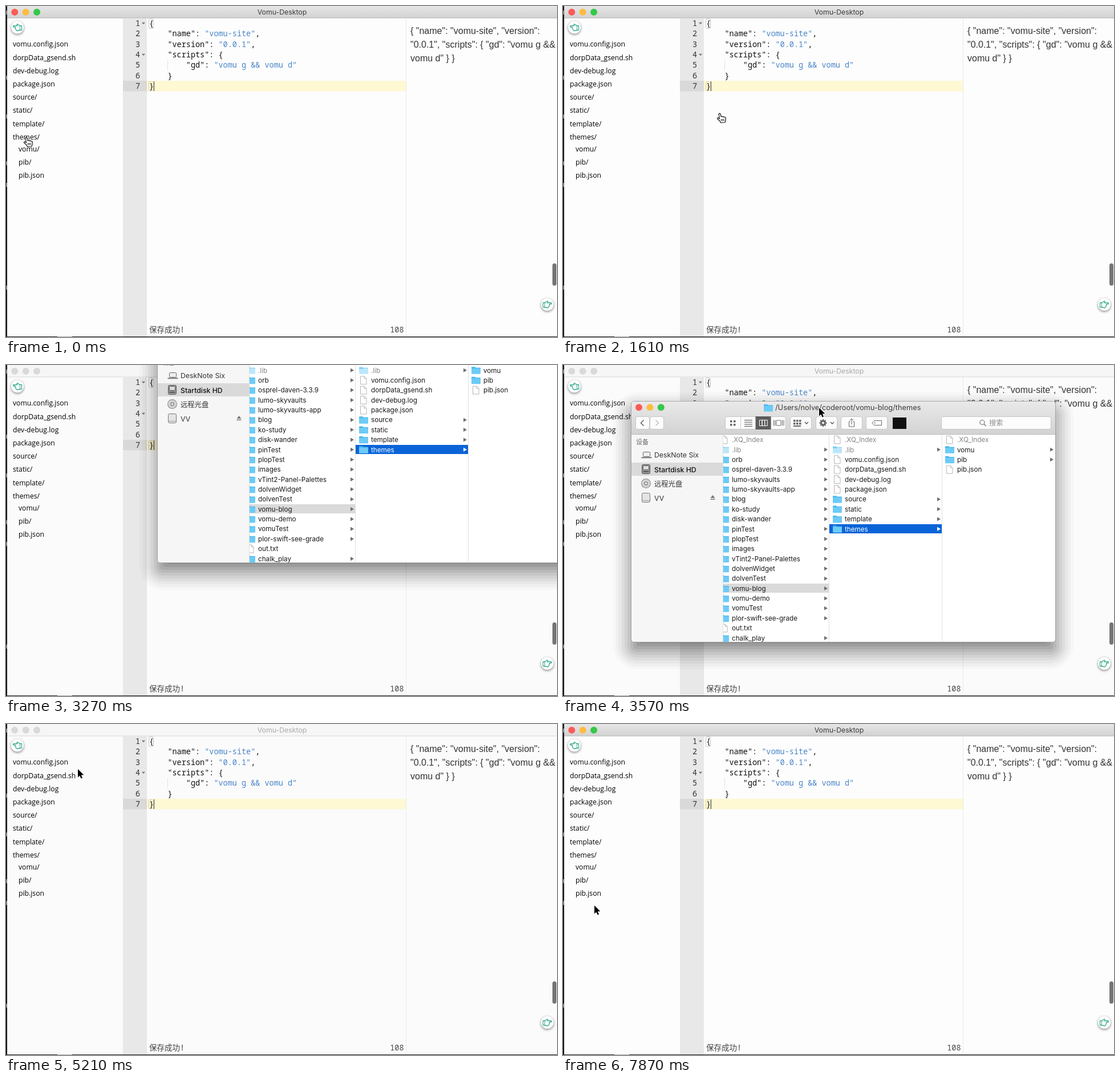
An HTML page with a canvas that plays this animation: 966 px wide and 580 px high, repeating every 8 s.

```html
<!DOCTYPE html>
<html lang="en">
<head>
<meta charset="utf-8">
<title>Desktop editor</title>
<style>
html, body { margin: 0; width: 100%; height: 100%; overflow: hidden; background: #fff; }
canvas { display: block; width: 966px; height: 580px; }
</style>
</head>
<body>
<canvas id="stage"></canvas>
<script>
const W = 966, H = 580, LOOP = 8000, STEP = 148.5;
const canvas = document.getElementById('stage');
const ctx = canvas.getContext('2d');
const dpr = window.devicePixelRatio || 1;
canvas.width = W * dpr;
canvas.height = H * dpr;

const UI = 'Inter, "Noto Sans CJK SC", "Noto Sans CJK", sans-serif';
const LIST = '12.2px "Open Sans", "Noto Sans", sans-serif';
const CODE = '13.5px "Noto Sans Mono", "Noto Sans CJK SC", "Noto Sans CJK", monospace';
const PROSE = '16px "Liberation Sans", sans-serif';
const LIGHTS = ['#fc5b57', '#fdbc40', '#34c84a'];
const BLUE = '#4a85c8', PICKED = '#0a64d8';

// Cursor path: step, x, y
const PATH = [
  [0, 36, 231], [5, 36, 231], [11, 275, 189], [15, 560, -40], [18, 729, -419],
  [22, 595, -64], [24, 449, 75], [29, 449, 75], [32, 133, 74], [33, 133, 74],
  [35, 126, 79], [42, 53, 297], [46, 53, 297], [50, 55, 318], [54, 55, 318]
];

const FILES = ['vomu.config.json', 'dorpData_gsend.sh', 'dev-debug.log', 'package.json',
  'source/', 'static/', 'template/', 'themes/'];
const CHILDREN = ['vomu/', 'pib/', 'pib.json'];

const COL1 = ['.XQ_Index', '.lib', 'orb', 'osprel-daven-3.3.9', 'lumo-skyvaults',
  'lumo-skyvaults-app', 'blog', 'ko-study', 'disk-wander', 'pinTest', 'plopTest',
  'images', 'vTint2-Panel-Palettes', 'dolvenWidget', 'dolvenTest', 'vomu-blog',
  'vomu-demo', 'vomuTest', 'plor-swift-see-grade', 'out.txt', 'chalk_play'];
const COL2 = ['.XQ_Index', '.lib', 'vomu.config.json', 'dorpData_gsend.sh',
  'dev-debug.log', 'package.json', 'source', 'static', 'template', 'themes'];
const COL3 = ['.XQ_Index', 'vomu', 'pib', 'pib.json'];

function rect(x, y, w, h, fill) {
  ctx.fillStyle = fill;
  ctx.fillRect(x, y, w, h);
}

function round(x, y, w, h, r, fill, stroke) {
  ctx.beginPath();
  ctx.roundRect(x, y, w, h, r);
  if (fill) { ctx.fillStyle = fill; ctx.fill(); }
  if (stroke) { ctx.strokeStyle = stroke; ctx.lineWidth = 1; ctx.stroke(); }
}

function disc(x, y, r, fill) {
  ctx.beginPath();
  ctx.arc(x, y, r, 0, Math.PI * 2);
  ctx.fillStyle = fill;
  ctx.fill();
}

function text(s, x, y, font, fill = '#000', align = 'left') {
  ctx.font = font;
  ctx.fillStyle = fill;
  ctx.textAlign = align;
  ctx.fillText(s, x, y);
}

function poly(points, fill, stroke, width = 1, open) {
  ctx.beginPath();
  points.forEach(([x, y], i) => i ? ctx.lineTo(x, y) : ctx.moveTo(x, y));
  if (!open) ctx.closePath();
  if (fill) { ctx.fillStyle = fill; ctx.fill(); }
  if (stroke) { ctx.strokeStyle = stroke; ctx.lineWidth = width; ctx.stroke(); }
}

function vertical(y0, y1, a, b) {
  const g = ctx.createLinearGradient(0, y0, 0, y1);
  g.addColorStop(0, a);
  g.addColorStop(1, b);
  return g;
}

function lights(x, y, active) {
  LIGHTS.forEach((c, i) => disc(x + i * 19.4, y, 6, active ? c : '#d9d9d9'));
}

// Round button with a pointing hand; dir 1 points right
function handButton(x, y, dir) {
  ctx.save();
  ctx.shadowColor = 'rgba(0,0,0,.5)';
  ctx.shadowBlur = 4 * dpr;
  ctx.shadowOffsetY = 1.5 * dpr;
  disc(x, y, 11, '#fff');
  ctx.restore();
  ctx.save();
  ctx.translate(x, y);
  ctx.scale(dir, 1);
  ctx.lineJoin = 'round';
  poly([[-7.5, -3], [-4, -3], [0, -6], [1, -5], [0, -3], [7, -3], [7.5, -1], [3.5, -0.5],
    [4, 1.5], [3, 2], [3, 4], [2, 4.5], [1, 6], [-4, 5], [-7.5, 4.5]], null, '#35ab8f', 1.3);
  poly([[-4.5, -3], [-4.5, 5]], null, '#35ab8f', 1, true);
  ctx.restore();
}

function codeLine(n, parts) {
  let col = 0;
  const y = 34.8 + (n - 1) * 18.35;
  for (const [s, fill] of parts) {
    text(s, 251 + col * 8.1, y, CODE, fill || '#111');
    col += s.length;
  }
}

function editor() {
  rect(205, 22, 42, 558, '#e8e8e8');
  rect(205, 131, 42, 18.5, '#d9d9d9');
  rect(247, 131, 454, 18.5, '#fef8d3');
  rect(701, 22, 1, 558, '#e9e9e9');
  rect(283, 95, 1, 18, '#e2e2e2');
  for (let n = 1; n <= 7; n++) {
    const y = 34.8 + (n - 1) * 18.35;
    text(n, 235, y, CODE, '#333', 'right');
    if (n === 1 || n === 4) poly([[238, y - 6], [244, y - 6], [241, y - 2.5]], '#777');
  }
  round(250.5, 22.5, 8, 17, 2, null, '#c4c4c4');
  round(250.5, 132.5, 8, 16, 2, null, '#d5d0b5');
  codeLine(1, [['{']]);
  codeLine(2, [['    "name": '], ['"vomu-site"', BLUE], [',']]);
  codeLine(3, [['    "version": '], ['"0.0.1"', BLUE], [',']]);
  codeLine(4, [['    "scripts": {']]);
  codeLine(5, [['        "gd": '], ['"vomu g && vomu d"', BLUE]]);
  codeLine(6, [['    }']]);
  codeLine(7, [['}']]);
  rect(259, 132, 1, 17, '#444');
  text('保存成功!', 251, 572, CODE, '#444');
  text('108', 697.5, 572, CODE, '#444', 'right');
}

function mainWindow(active, tint) {
  rect(0, 0, W, H, active ? '#fdfdfd' : '#fbfbfb');
  if (tint) rect(2, 22, 155, 558, '#f4f5fa');
  editor();

  rect(0, 0, W, 21, active ? vertical(0, 21, '#e6e6e6', '#d2d2d2') : '#f6f6f6');
  rect(0, 20.5, W, 1, active ? '#b5b5b5' : '#d8d8d8');
  lights(15.3, 10.8, active);
  text('Vomu-Desktop', 484, 15.3, '12.3px ' + UI, active ? '#3c3c3c' : '#aaa', 'center');

  FILES.forEach((s, i) => text(s, 12, 71.4 + i * 23.2, LIST));
  CHILDREN.forEach((s, i) => text(s, 22, 255.2 + i * 23, LIST));

  text('{ "name": "vomu-site", "version":', 709, 48.6, PROSE, '#333');
  text('"0.0.1", "scripts": { "gd": "vomu g &&', 709, 72.6, PROSE, '#333');
  text('vomu d" } }', 709, 96.6, PROSE, '#333');

  round(958, 451, 7, 39, 3.5, '#757575');
  handButton(20, 37.5, -1);
  handButton(949, 523, 1);

  rect(0, 0, 2, H, '#111');
  [8, 122, 190, 272, 310, 490].forEach(y => rect(0, y, 2, 7, '#777'));
  rect(0, 579, W, 1, '#222');
  rect(90, 579, 26, 1, '#aaa');
}

function folder(x, y, faded) {
  ctx.globalAlpha = faded ? 0.45 : 1;
  round(x, y - 6, 7, 4, 1, '#43b4e6');
  round(x, y - 4.5, 16, 11, 1, '#6ccbf7');
  rect(x, y - 4.5, 16, 1, '#43b4e6');
  ctx.globalAlpha = 1;
}

function page(x, y) {
  poly([[x + 2.5, y - 7], [x + 9, y - 7], [x + 13, y - 3], [x + 13, y + 7], [x + 2.5, y + 7]],
    '#fff', '#b5b5b5');
  poly([[x + 9, y - 7], [x + 9, y - 3], [x + 13, y - 3]], null, '#b5b5b5', 1, true);
}

function column(items, x, right, selected, fill) {
  items.forEach((s, i) => {
    const y = 67 + i * 17.37;
    const chosen = i === selected;
    const light = chosen && fill === PICKED;
    const hidden = s[0] === '.';
    const isFile = s === '.XQ_Index' || /\.(json|sh|log|txt)$/.test(s);
    if (chosen) rect(x - 6, Math.round(y - 8.3), right - x + 6, 16, fill);
    if (isFile) page(x, y); else folder(x, y, hidden);
    text(s, x + 21, y + 4.2, '11.7px ' + UI, light ? '#fff' : hidden ? '#858585' : '#1a1a1a');
    if (!isFile) {
      const a = right - 8;
      poly([[a, y - 3.5], [a + 6, y], [a, y + 3.5]], light ? '#fff' : '#6f6f6f');
    }
  });
}

function button(x, w) {
  round(x + .5, 26.5, w - 1, 22, 3.5, '#fcfcfc', '#c6c6c6');
}

function chevron(x, y) {
  poly([[x - 3, y - 1.5], [x, y + 1.5], [x + 3, y - 1.5]], null, '#555', 1.4, true);
}

function grid(x, y, size, gap, cols, rows) {
  for (let i = 0; i < cols * rows; i++)
    rect(x + (i % cols) * gap, y + Math.floor(i / cols) * gap, size, size, '#666');
}

function toolbar() {
  button(7, 25);
  button(32, 25);
  poly([[21.5, 32.5], [16.5, 37.5], [21.5, 42.5]], null, '#555', 1.4, true);
  poly([[42.5, 32.5], [47.5, 37.5], [42.5, 42.5]], null, '#bbb', 1.4, true);

  button(164, 107);
  rect(191, 27, 1, 22, '#ccc');
  rect(244, 27, 1, 22, '#ccc');
  grid(173, 33, 3.5, 6, 2, 2);
  for (let i = 0; i < 4; i++) rect(198, 32 + i * 3.6, 14, 1.2, '#666');
  rect(217.5, 26, 27, 23, '#5c5c5c');
  for (let i = 0; i < 3; i++) round(224.5 + i * 4.6, 32.5, 4.6, 10, 0, null, '#fff');
  round(254, 33, 8, 9, 1, null, '#666');
  [249, 251.5, 264, 266.5].forEach(x => rect(x, 32.5, 1, 10, '#666'));

  button(278, 38);
  grid(284, 32, 3.5, 5, 3, 2);
  rect(284, 42, 13, 2, '#666');
  chevron(307, 37.5);
  button(323, 38);
  for (let i = 0; i < 8; i++) {
    const a = i * Math.PI / 4, c = Math.cos(a), s = Math.sin(a);
    poly([[336 + c * 3, 37.5 + s * 3], [336 + c * 6.5, 37.5 + s * 6.5]], null, '#666', 2.4, true);
  }
  disc(336, 37.5, 4.8, '#666');
  disc(336, 37.5, 1.9, '#fcfcfc');
  chevron(352, 37.5);

  button(367, 38);
  poly([[383.5, 35], [381.5, 35], [381.5, 44], [390.5, 44], [390.5, 35], [388.5, 35]],
    null, '#666', 1, true);
  poly([[386, 40], [386, 30]], null, '#666', 1, true);
  poly([[383, 33], [386, 30], [389, 33]], null, '#666', 1, true);
  button(411, 38);
  poly([[422, 37.5], [425.5, 33.5], [438.5, 33.5], [438.5, 41.5], [425.5, 41.5]], null, '#666');
  disc(426.5, 37.5, 1, '#666');
  rect(458, 28, 24, 20, '#111');

  button(543, 193);
  ctx.beginPath();
  ctx.arc(615, 36.5, 4, 0, Math.PI * 2);
  ctx.strokeStyle = '#777';
  ctx.lineWidth = 1.2;
  ctx.stroke();
  poly([[618, 39.5], [621.5, 43]], null, '#777', 1.4, true);
  text('搜索', 627, 42.2, '12.3px ' + UI, '#8c8c8c');
}

function sidebar() {
  rect(0, 58, 160, 363, '#f6f6f6');
  text('设备', 8, 75.3, '500 11px ' + UI, '#6a6a6a');
  rect(0, 107, 160, 23, '#dadada');
  round(20.5, 88.5, 12, 8, 1, '#eee', '#666');
  rect(17.5, 97.5, 18, 1.7, '#666');
  round(18.5, 110.5, 14, 16, 2, '#999', '#555');
  round(20.5, 112.5, 10, 7, 1, '#ddd', '#555');
  rect(20.5, 122, 10, 1.5, '#444');
  disc(25.5, 143.5, 8.5, '#8a8a8a');
  disc(25.5, 143.5, 7.5, '#d2d2d2');
  disc(25.5, 143.5, 3.2, '#858585');
  disc(25.5, 143.5, 1.8, '#f6f6f6');
  round(18.5, 160.5, 14, 16, 2, '#e4e4e4', '#777');
  rect(19, 173, 13, 1, '#999');
  ['DeskNote Six', 'Startdisk HD', '远程光盘', 'VV'].forEach((s, i) =>
    text(s, 40, 98.4 + i * 25.1, (i === 1 ? '500 ' : '') + '12.3px ' + UI, i === 1 ? '#111' : '#333'));
  poly([[138.5, 169], [142.5, 164], [146.5, 169]], '#777');
  rect(138.5, 170.5, 8, 1.5, '#777');
}

// Stepped shadow, offset downwards and denser towards its core
function shadow(w, h) {
  for (let i = 0; i < 10; i++) {
    const m = 32 - i * 5;
    round(-m, 16 - m, w + 2 * m, h + 2 * m, Math.max(6, m + 10), `rgba(0,0,0,${.02 + .008 * i})`);
  }
}

function browser(x, y) {
  const w = 743, h = 421;
  ctx.save();
  ctx.translate(x, y);
  shadow(w, h);
  round(-.5, -.5, w + 1, h + 1, 5, '#fff', '#a5a5a5');
  ctx.beginPath();
  ctx.roundRect(0, 0, w, h, 5);
  ctx.clip();
  rect(0, 0, w, h, '#fff');
  rect(0, 0, w, 57, vertical(0, 57, '#e9e9e9', '#d3d3d3'));
  rect(0, 57, w, 1, '#b8b8b8');
  lights(13, 10.3, true);
  folder(232, 11);
  text('/Users/nolve/coderoot/vomu-blog/themes', 252, 15.2, '12.8px ' + UI, '#3c3c3c');
  toolbar();
  sidebar();

  [160, 346, 544].forEach(c => rect(c, 58, 1, h, '#e0e0e0'));
  ctx.save();
  ctx.beginPath();
  ctx.rect(161, 58, 185, h);
  ctx.clip();
  column(COL1, 155, 346, 15, '#dadada');
  ctx.restore();
  column(COL2, 353, 544, 9, PICKED);
  column(COL3, 550, 742, -1);
  ctx.restore();
}

function arrow(x, y) {
  ctx.save();
  ctx.translate(x, y);
  ctx.lineJoin = 'round';
  const shape = [[0, 0], [0, 14.5], [3.3, 11.4], [5.6, 16.6], [8, 15.6], [5.8, 10.5], [10.3, 10.3]];
  poly(shape, '#000', '#fff', 2);
  poly(shape, '#000');
  ctx.restore();
}

function hand(x, y) {
  ctx.save();
  ctx.translate(x, y);
  ctx.lineJoin = 'round';
  poly([[-2, 0], [-.5, -1], [1, 0], [2.2, 5], [4, 4.3], [5, 5.3], [7, 4.8], [8, 6], [9.7, 6],
    [10.3, 8], [10, 11.5], [9, 15], [1.5, 15.5], [0, 12.5], [-4, 9], [-4.5, 7.3], [-3, 6.8], [-.5, 8.5]],
    '#fff', '#111', 1.2);
  [2.5, 4.7, 6.9].forEach(f => poly([[f, 9], [f + .2, 12.5]], null, '#111', 1, true));
  ctx.restore();
}

function cursorAt(k) {
  const i = PATH.findIndex(p => p[0] > k);
  const a = PATH[i - 1], b = PATH[i];
  const u = (k - a[0]) / (b[0] - a[0]);
  return [a[1] + (b[1] - a[1]) * u, a[2] + (b[2] - a[2]) * u];
}

function draw(t) {
  const k = Math.min(53, Math.floor((t + 25) / STEP));
  const [x, y] = cursorAt(k);
  ctx.setTransform(dpr, 0, 0, dpr, 0, 0);
  mainWindow(k < 18 || k >= 38, k >= 42 && k <= 46);
  if (k >= 18 && k < 34) {
    const dragging = k < 24;
    browser(dragging ? Math.round(x - 329) : 120, dragging ? Math.round(y - 11) : 64);
  }
  if (k <= 12 || (k >= 39 && k <= 46)) hand(x, y); else arrow(x, y);
}

function loop(now) {
  draw(now % LOOP);
  requestAnimationFrame(loop);
}
draw(0);
requestAnimationFrame(loop);
</script>
</body>
</html>
```
